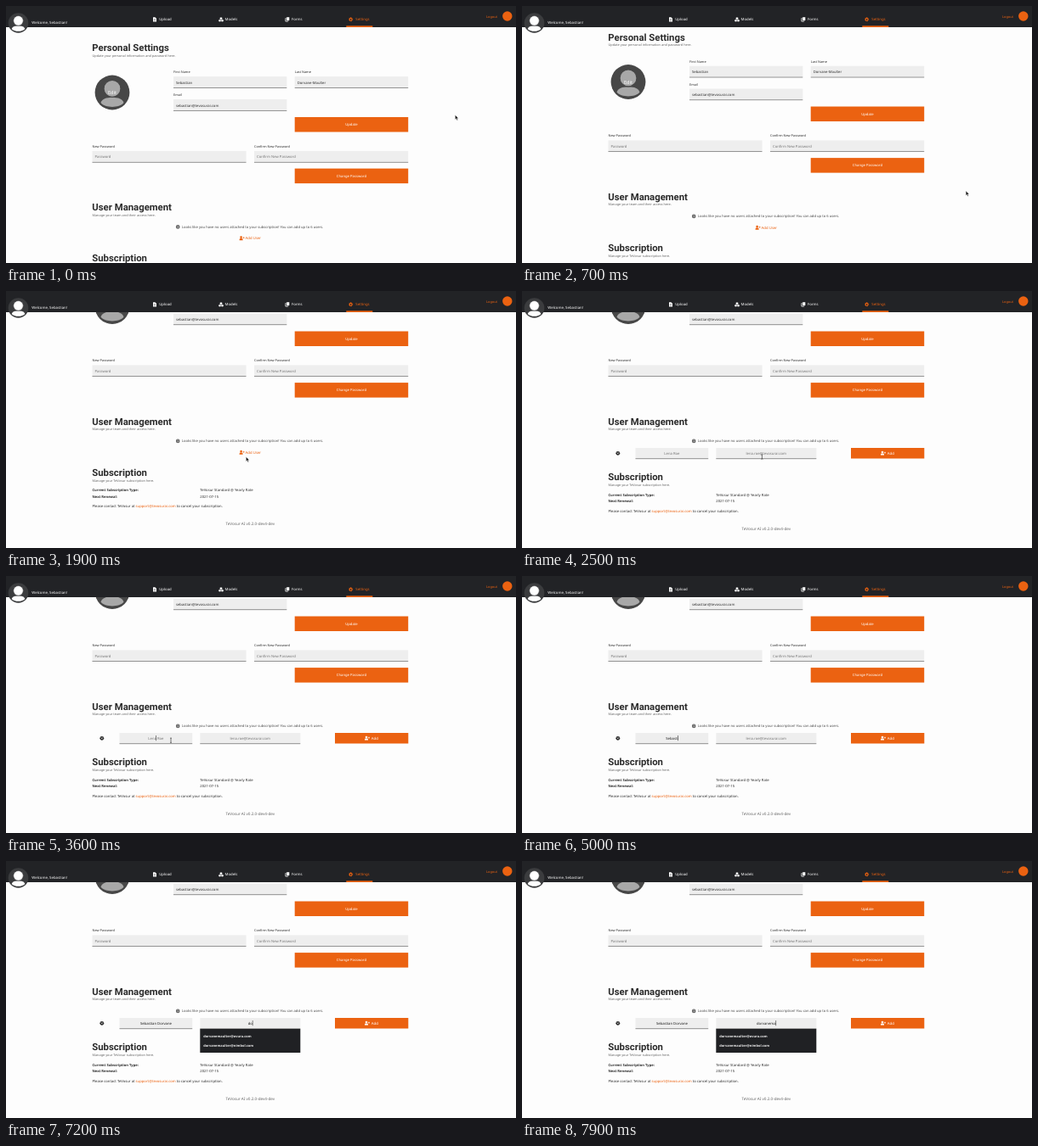
An HTML page that plays this animation: 600 by 303 pixels, repeating every 8 s.

```html
<!DOCTYPE html>
<html lang="en">
<head>
<meta charset="utf-8">
<title>Settings</title>
<style>
  html, body { margin: 0; width: 100%; height: 100%; overflow: hidden; background: #fdfdfd; }
  svg { display: block; width: 600px; height: 303px; }
  text { font-family: "Noto Sans", sans-serif; white-space: pre; text-rendering: geometricPrecision; }
  .heading { font-family: Roboto, sans-serif; }
</style>
</head>
<body>
<svg id="stage" viewBox="0 0 600 303"></svg>
<script>
const ORANGE = '#eb6211', INK = '#2c2c2c', GREY = '#686868', HINT = '#757575';
const SCROLL_END = 83.5, FORM_SHIFT = 5.5, LOOP = 8000;
const NAME = 'Sebastian Dorvane', MAIL = 'dorvanema';
const NAME_HINT = 'Lena Roe', MAIL_HINT = 'lena.roe@tevosurai.com';
const NAME_KEYS = [4000, 4200, 4400, 4500, 4600, 4800, 5000, 5100, 5200, 5400, 5600, 5700, 5800, 6000, 6100, 6200, 6400];
const MAIL_KEYS = [7000, 7200, 7300, 7400, 7500, 7600, 7700, 7800, 7900];
const NAME_X = 176.4, MAIL_X = 287.3;

// y is the optical middle of a line of text
const text = (x, y, str, { size = 4.2, fill = INK, anchor = 'start', weight = 400, extra = '' } = {}) =>
  `<text x="${x}" y="${y + size * 0.36}" font-size="${size}" fill="${fill}" text-anchor="${anchor}" font-weight="${weight}" ${extra}>${str}</text>`;
const rect = (x, y, w, h, fill) => `<rect x="${x}" y="${y}" width="${w}" height="${h}" fill="${fill}"/>`;
const at = (x, y, inner) => `<g transform="translate(${x} ${y})">${inner}</g>`;
const heading = (y, str) => text(101.3, y, str, { size: 11.35, weight: 600, extra: 'class="heading"' });
const subtitle = (y, str) => text(101.5, y, str, { size: 3.83, fill: GREY });
const label = (x, y, str) => text(x, y, str, { size: 3.83 });
const field = (x, y, w, h = 13.5) => rect(x, y, w, h, '#eeeeee') + rect(x, y + h - 0.5, w, 0.6, '#555');
const input = (x, y, w, str, fill = INK) => field(x, y, w) + text(x + 3, y + 7, str, { fill });
const button = (y, str) => rect(339.7, y, 133.5, 17.5, ORANGE) +
  text(406.4, y + 8.8, str, { fill: '#fff', anchor: 'middle', weight: 500 });
const avatar = (x, y, scale, back, front) => `<g transform="translate(${x} ${y}) scale(${scale})">
  <circle r="20.4" fill="${back}"/>
  <path d="M-13.5 12c2-5 6-6 13.5-6s11.5 1 13.5 6c-5 6.5-22 6.5-27 0z" fill="${front}"/>
  <circle cy="-4.6" r="10" fill="${front}" stroke="${back}" stroke-width="1.2"/></g>`;
const userPlus = (x, y, fill) => at(x, y, `<circle cx="2" cy="-1.2" r="1.3" fill="${fill}"/>
  <path d="M0 2.4v-.8Q0 .3 1.3.3h1.4Q4 .3 4 1.6v.8z" fill="${fill}"/>
  <path d="M4 -.6h2M5 -1.6v2" stroke="${fill}" stroke-width=".6"/>`);

const icons = {
  upload: '<path d="M-2-2.6h2.4l1.6 1.6v3.6h-4z" fill="#fff"/><path d="M0 2v-2.2M-1 .6 0-.4 1 .6" fill="none" stroke="#222326" stroke-width=".5"/>',
  models: '<path d="M0-2.5 1.4-1.9V-.4L0 .2-1.4-.4V-1.9zM-1.5.1-.2.7v1.4l-1.3.6-1.3-.6V.7zM1.5.1 2.8.7v1.4l-1.3.6L.2 2.1V.7z" fill="#fff"/>',
  forms: '<path d="M-.8-2.6h3.1v3.8H-.8z" fill="#fff"/><path d="M-1.5-1.4h-.6v3.7h3v-.6" fill="none" stroke="#fff" stroke-width=".8"/>',
  settings: `<g fill="none" stroke="${ORANGE}"><circle r="1.4" stroke-width="1.1"/><circle r="2.1" stroke-width=".9" stroke-dasharray=".825"/></g>`
};
const navItem = (iconX, textX, icon, str, fill = '#fff') =>
  at(iconX, 15.8, icons[icon]) + text(textX, 15.8, str, { size: 4.3, fill, weight: 500 });

const header = rect(0, 0, 600, 25, '#222326') +
  avatar(14.5, 20, 0.58, '#3b3c3e', '#fff') +
  text(30.3, 19.5, 'Welcome, Sebastian!', { size: 4.3, fill: '#fff' }) +
  navItem(175, 180.2, 'upload', 'Upload') +
  navItem(253, 257.6, 'models', 'Models') +
  navItem(331, 336, 'forms', 'Forms') +
  navItem(405.6, 411.3, 'settings', 'Settings', ORANGE) +
  rect(400.3, 23.3, 31, 1.7, ORANGE) +
  text(565, 12.2, 'Logout', { size: 3.9, fill: ORANGE }) +
  `<circle cx="589.8" cy="12" r="5.7" fill="${ORANGE}"/>`;

const profile = heading(49, 'Personal Settings') +
  subtitle(58.6, 'Update your personal information and password here.') +
  avatar(125, 102, 1, '#474747', '#a8a8a8') +
  text(125, 102.4, 'Edit', { size: 5.6, fill: '#fff', anchor: 'middle' }) +
  label(197, 78, 'First Name') + input(197, 83.2, 133.3, 'Sebastian') +
  label(339.7, 78, 'Last Name') + input(339.7, 83.2, 133.5, 'Dorvane-Maulter') +
  label(197, 104.8, 'Email') + input(197, 110, 133.3, 'sebastian@tevosurai.com') +
  button(131, 'Update') +
  label(101.5, 165.6, 'New Password') + input(101.5, 170.9, 181, 'Password', HINT) +
  label(292, 165.6, 'Confirm New Password') + input(292, 170.9, 181.2, 'Confirm New Password', HINT) +
  button(191.6, 'Change Password');

const users = heading(237, 'User Management') +
  subtitle(246.2, 'Manage your team and their access here.') +
  `<circle cx="202.2" cy="260.4" r="2.3" fill="${GREY}"/>` +
  rect(201.9, 260, 0.6, 1.6, '#fff') + rect(201.9, 258.9, 0.6, 0.6, '#fff') +
  text(206.8, 260.4, 'Looks like you have no users attached to your subscription! You can add up to 6 users.', { size: 4.14, fill: '#4a4a4a' }) +
  `<g id="addLink">${userPlus(274.6, 273.8, ORANGE)}${text(281.6, 273.8, 'Add User', { size: 4.3, fill: ORANGE })}</g>`;

const subscription = heading(297, 'Subscription') +
  subtitle(307, 'Manage your TeVosur subscription here.') +
  text(101.5, 318.2, 'Current Subscription Type:', { size: 4.1, weight: 700 }) +
  text(228.3, 318.2, 'TeVosur Standard @ Yearly Rate') +
  text(101.5, 325.8, 'Next Renewal:', { size: 4.1, weight: 700 }) +
  text(228.3, 325.8, '2021-07-15') +
  text(101.5, 337, `Please contact TeVosur at <tspan fill="${ORANGE}">support@tevosurai.com</tspan> to cancel your subscription.`) +
  text(287.3, 358.3, 'TeVosur AI v0.2.0-dev4-dev', { size: 4.6, fill: GREY, anchor: 'middle' });

const form = `<circle cx="112.8" cy="191.3" r="2.4" fill="${INK}"/>
  <path d="M112 190.5l1.6 1.6M113.6 190.5l-1.6 1.6" stroke="#fff" stroke-width=".6"/>` +
  field(133.5, 185, 85.7, 13) + field(228.3, 185, 118, 13) +
  text(NAME_X, 191.2, '', { anchor: 'middle', extra: 'id="nameText"' }) +
  text(MAIL_X, 191.2, '', { anchor: 'middle', extra: 'id="mailText"' }) +
  rect(387, 185, 86.3, 12.5, ORANGE) + userPlus(422, 191.2, '#fff') +
  text(429.8, 191.2, 'Add', { size: 4.3, fill: '#fff', weight: 500 }) +
  '<rect id="caret" y="188" width=".5" height="6.2" fill="#111"/>';

const suggestions = `<g id="suggestions">${rect(228.3, 198, 118, 28, '#202124')}` +
  ['ovura', 'nimbol'].map((host, i) =>
    text(232.2, 206.4 + 11.2 * i, `dorvanemaulter@${host}.com`, { size: 3.95, fill: '#eee', weight: 600 })).join('') + '</g>';

const cursors = `<path id="arrow" d="M0 0v5.4l1.2-1.1.9 2 1-.4-.9-2h1.7z" fill="#111" stroke="#fff" stroke-width=".4"/>
  <path id="beam" d="M-1-2.8Q0-2.8 0-2.2V2.2Q0 2.8-1 2.8M1-2.8Q0-2.8 0-2.2M0 2.2Q0 2.8 1 2.8" fill="none" stroke="#222" stroke-width=".6"/>`;

document.getElementById('stage').innerHTML =
  `<g id="page">${profile}${users}<g id="lower">${subscription}</g></g>
   <g id="form">${form}</g>${suggestions}${header}${cursors}`;

const el = id => document.getElementById(id);
const show = (id, on) => el(id).setAttribute('visibility', on ? 'visible' : 'hidden');
const move = (id, x, y) => el(id).setAttribute('transform', `translate(${x} ${y})`);
const ease = (t, from, to) => {
  const u = Math.min(1, Math.max(0, (t - from) / (to - from)));
  return u * u * (3 - 2 * u);
};
const typed = (str, keys, t) => str.slice(0, keys.filter(k => t >= k).length);

// Pointer legs: start, end, target x, target y
const LEGS = [[50, 250, 522.2, 218], [1280, 1850, 282.4, 195.5], [2950, 3500, 194, 193.7]];
function pointer(t) {
  let x = 528.4, y = 128.5;
  for (const [from, to, tx, ty] of LEGS) {
    const k = ease(t, from, to);
    x += (tx - x) * k;
    y += (ty - y) * k;
  }
  return [x, y];
}

function fill(id, value, hint) {
  el(id).textContent = value || hint;
  el(id).setAttribute('fill', value ? '#1c1c1c' : HINT);
}

function draw(t) {
  const formOpen = t >= 2400, inMail = t >= 6600;
  move('page', 0, -SCROLL_END * ease(t, 540, 1200));
  move('lower', 0, formOpen ? FORM_SHIFT : 0);
  show('addLink', !formOpen);
  show('form', formOpen);

  const name = typed(NAME, NAME_KEYS, t), mail = typed(MAIL, MAIL_KEYS, t);
  fill('nameText', name, NAME_HINT);
  fill('mailText', mail, MAIL_HINT);
  show('suggestions', mail);

  const active = inMail ? mail : name;
  const half = active ? el(inMail ? 'mailText' : 'nameText').getComputedTextLength() / 2 : 0;
  el('caret').setAttribute('x', (inMail ? MAIL_X : NAME_X) + half);
  show('caret', t >= 3500);

  const [x, y] = pointer(t);
  move('arrow', x, y);
  move('beam', x, y);
  show('arrow', !formOpen);
  show('beam', formOpen && t < 4000);
}

function tick() {
  draw(performance.now() % LOOP);
  requestAnimationFrame(tick);
}
tick();
</script>
</body>
</html>
```
